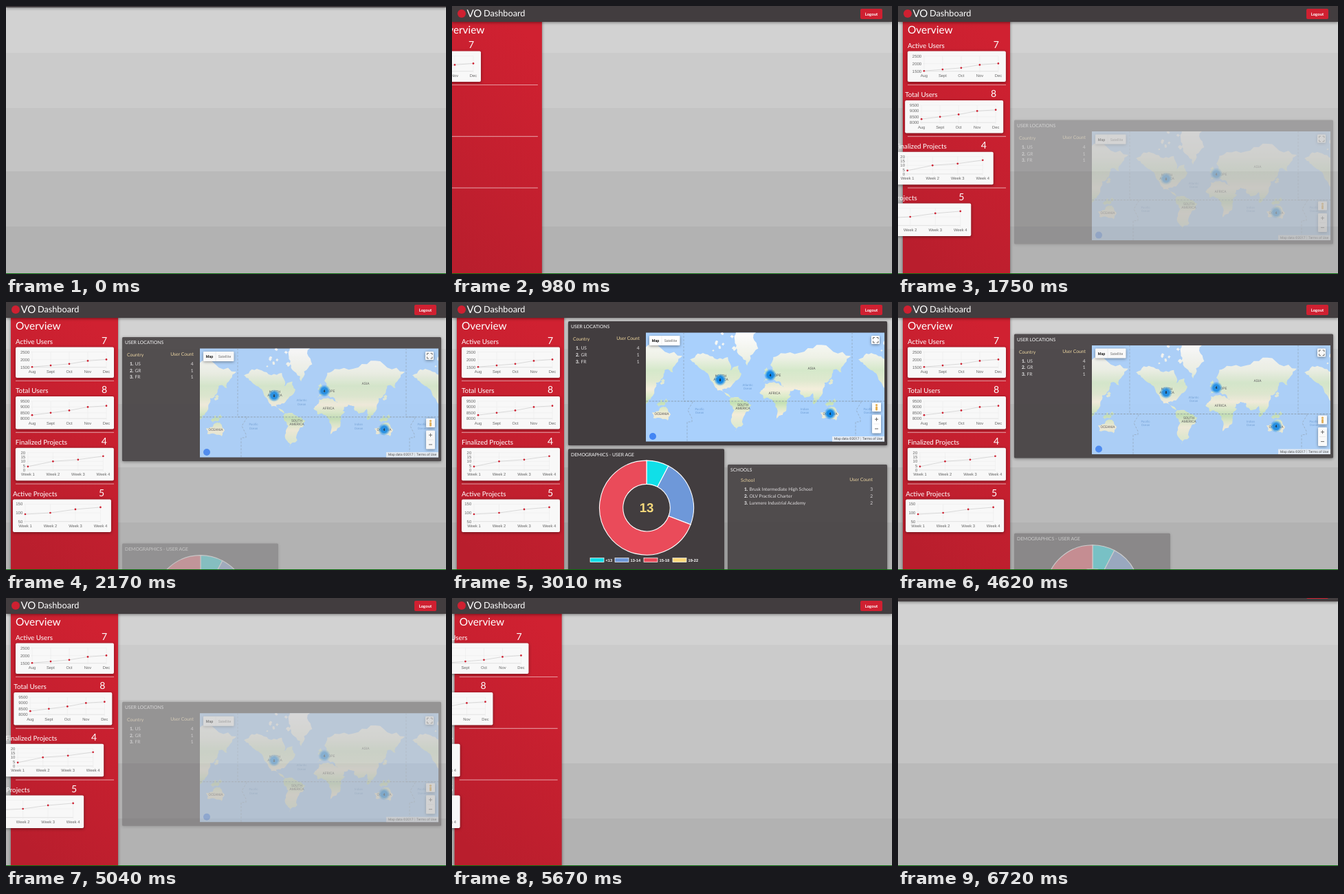
Write an HTML page that moves like this. It is 640 px wide and 389 px high and loops after 6790 ms.

```html
<!DOCTYPE html>
<html lang="en">
<head>
<meta charset="utf-8">
<title>Dashboard</title>
<style>
  html, body { margin: 0; width: 100%; height: 100%; overflow: hidden; background: #c4c4c4; }
  svg { display: block; width: 100vw; height: 100vh; }
  text { font-family: Lato, "Open Sans", sans-serif; text-rendering: geometricPrecision; }
  .ui { font-family: "Liberation Sans", sans-serif; }
  .map { font-family: Roboto, sans-serif; }
  .bold { font-weight: 700; }
  .shadow { filter: drop-shadow(0 1px 2px rgba(0,0,0,.45)); }
</style>
</head>
<body>
<svg id="stage" viewBox="0 0 640 389" preserveAspectRatio="none"></svg>
<script>
const LOOP = 6790, STEP = 70, TURN = 6825;
const DARK = '#423d3f', RED = '#cf2031', GOLD = '#f0d79c';
const MID = 'text-anchor="middle"', END = 'text-anchor="end"';

const rect = (x, y, w, h, fill, more = '') =>
  `<rect x="${x}" y="${y}" width="${w}" height="${h}" fill="${fill}" ${more}/>`;
const text = (x, y, s, size, fill = '#fff', more = '') =>
  `<text x="${x}" y="${y}" font-size="${size}" fill="${fill}" ${more}>${s}</text>`;
const line = (x1, y1, x2, y2, stroke, width = .5, more = '') =>
  `<path d="M${x1} ${y1}L${x2} ${y2}" stroke="${stroke}" stroke-width="${width}" ${more}/>`;
const circle = (x, y, r, fill, more = '') =>
  `<circle cx="${x}" cy="${y}" r="${r}" fill="${fill}" ${more}/>`;
const group = (id, body) => `<g id="${id}">${body}</g>`;
const join = (list, draw) => list.map(draw).join('');

// Each band covers the lower part of the one before
const bands = { 0: '#d2d2d2', 68: '#cbcbcb', 148: '#c4c4c4', 240: '#bababa', 320: '#b2b2b2' };
const background = join(Object.entries(bands), ([y, fill]) => rect(0, y, 640, 389 - y, fill));

// Sidebar
const months = ['Aug', 'Sept', 'Oct', 'Nov', 'Dec'];
const weeks = [1, 2, 3, 4].map(n => 'Week ' + n);
const cards = [
  { title: 'Active Users', count: 7, labels: months, min: 1500, max: 2500, step: 500, values: [1520, 1620, 1720, 1920, 2010] },
  { title: 'Total Users', count: 8, labels: months, min: 8000, max: 9500, step: 500, values: [8300, 8500, 8700, 9000, 9100] },
  { title: 'Finalized Projects', count: 4, labels: weeks, min: 0, max: 20, step: 5, values: [4, 10, 12, 16] },
  { title: 'Active Projects', count: 5, labels: weeks, min: 50, max: 150, step: 50, values: [92, 100, 120, 132] }
];
const ruleY = i => 114.6 + 74.7 * i;

function card({ title, count, labels, min, max, step, values }, i) {
  const top = i ? ruleY(i - 1) + 22.4 : 65.5, height = i ? 47.5 : 44.5;
  const left = labels === months ? 38 : 32, gap = labels === months ? 27 : 36.5;
  const high = top + 7, low = top + height - 15.3;
  const xAt = k => left + k * gap;
  const yAt = v => low - (v - min) / (max - min) * (low - high);
  let s = text(14, top - 4.8, title, 9.8) + text(143, top - 4.8, count, 14, '#fff', MID) +
    rect(14, top, 143, height, '#f8f8f8', 'rx="2" class="shadow"');
  for (let v = min; v <= max; v += step) {
    s += line(left - 2, yAt(v), xAt(labels.length - 1), yAt(v), v === min ? '#ccc' : '#e9e9e9');
    s += text(left - 3.7, yAt(v) + 2, v, 6, '#666', END + ' class="ui"');
  }
  s += join(labels, (l, k) => line(xAt(k), high, xAt(k), low + 2, '#e9e9e9') +
    text(xAt(k), low + 8.3, l, 5.8, '#666', MID + ' class="ui"'));
  const points = values.map((v, k) => [xAt(k), yAt(v)]);
  s += `<polyline points="${points}" fill="none" stroke="#ccc" stroke-width=".7"/>`;
  return group('card' + i, s + join(points, p => circle(...p, 1.35, RED)));
}

const sidebar = rect(7, 18, 156, 371, 'url(#red)', 'class="shadow"') + text(14, 40, 'Overview', 15.4) +
  join([0, 1, 2], i => line(14, ruleY(i), 157, ruleY(i), '#fff', .8, 'opacity=".75"')) + join(cards, card);

const header = rect(0, -10, 640, 33, DARK, 'class="shadow"') +
  circle(14, 11, 6, RED) + text(21.5, 16, 'VO', 15) + text(46, 15.2, 'Dashboard', 12.7) +
  rect(594, 4, 32, 15, RED, 'rx="2"') + text(610, 13.5, 'Logout', 6, '#fff', MID + ' class="bold"');

// World map: Mercator outlines from key points, roughened by midpoint displacement
const PERIOD = 245, EQUATOR = 144, DATE_LINE = 337;
const project = (lon, lat) => [
  459 + lon * PERIOD / 360,
  EQUATOR - PERIOD / (2 * Math.PI) * Math.log(Math.tan(Math.PI / 4 + lat * Math.PI / 360))
];
let seed = 7;
const random = () => (seed = seed * 16807 % 2147483647) / 2147483647 - .5;

function roughen(points) {
  return points.flatMap(([x, y], i) => {
    const [nx, ny] = points[(i + 1) % points.length], k = random() * .4;
    return [[x, y], [(x + nx) / 2 - (ny - y) * k, (y + ny) / 2 + (nx - x) * k]];
  });
}
const outline = points => 'M' + join(roughen(roughen(roughen(points))),
  p => p.map(v => v.toFixed(1)).join(' ') + ' ') + 'Z';
const coast = keys => outline(keys.split(' ').map(key => project(...key.split(',').map(Number))));

const continents = [
  '-166,66 -128,70 -85,68 -80,55 -62,60 -56,50 -80,28 -97,25 -79,8 -107,22 -124,45 -150,60',
  '-78,8 -50,0 -35,-7 -48,-27 -68,-54 -74,-45 -71,-18 -81,-4',
  '-6,35 32,31 50,11 40,-8 32,-28 19,-35 10,3 -8,5 -17,18',
  '-9,38 10,55 6,61 28,71 105,76 178,69 158,52 140,55 122,37 118,24 103,2 97,17 78,8 70,22 57,25 44,13 34,30 27,38 10,43',
  '114,-23 135,-12 143,-12 153,-27 147,-38 116,-34',
  '-70,78 -55,83 -25,83 -20,74 -44,60 -54,68'
];
function archipelago(lon, lat, width, height, count) {
  return join(Array(count).fill(), () => {
    const [x, y] = project(lon + random() * width, lat + random() * height), r = 2.5 + 2 * random();
    return outline([[x - r, y], [x, y - r], [x + r, y], [x, y + r]]);
  });
}
const land = join(continents, coast) + archipelago(-95, 76, 50, 10, 9) + archipelago(122, -3, 45, 10, 8) +
  archipelago(137, 36, 8, 10, 3) + archipelago(-3, 54, 3, 6, 2);

// Vegetation follows latitude
const climate = { 80: '#fbfbfb', 68: '#eef1e6', 55: '#d5e8ca', 40: '#dfe9cf', 25: '#f4eedc', 10: '#dcebc9',
  '-3': '#c3e0b4', '-15': '#dde9c8', '-27': '#f3ecd8', '-45': '#e0ead0' };
const climateStops = join(Object.keys(climate).sort((a, b) => b - a), lat =>
  `<stop offset="${project(0, +lat)[1] / 389}" stop-color="${climate[lat]}"/>`);

const mapLabel = (x, y, s, fill = '#555', size = 5) =>
  join(s.split(' '), (w, i) => text(x, y + i * 5.3, w, size, fill, MID + ' class="map"'));
const ocean = (x, y, name) => mapLabel(x, y, name + ' Ocean', '#6f9fd8', 4.4);
const cluster = (x, y, n) => circle(x, y, 8.5, '#1b8fea', 'opacity=".3"') + circle(x, y, 7, '#1b8fea', 'opacity=".55"') +
  circle(x, y, 5.4, '#168ae6') + text(x, y + 1.9, n, 5.2, '#111', MID + ' class="ui bold"');
const dateLine = x => `<path d="M${x} 44v100h14l-8 13l6 12v5h-7v29" fill="none"
  stroke="#8b9bab" stroke-width=".6" stroke-dasharray="3 2"/>`;
const button = (x, y, w, h) => rect(x, y, w, h, '#fff', 'rx="1" class="shadow"');
const bar = (x, y) => line(x - 2.5, y, x + 2.5, y, '#666', 1);

const mapControls = button(287, 49, 44.5, 14) + line(305, 49, 305, 63, '#ddd') +
  text(296, 58, 'Map', 5.4, '#111', MID + ' class="map bold"') +
  text(318, 58, 'Satellite', 5.2, '#666', MID + ' class="map"') +
  button(610, 49, 12, 12) +
  rect(612.5, 51.5, 7.5, 7.5, 'none', 'stroke="#666" stroke-dasharray="2.5 2.5 2.5 0"') +
  button(611, 146, 13, 13) + circle(617.5, 149.6, 1.6, '#e6b053') + rect(616, 151.5, 3, 6, '#e6b053', 'rx="1"') +
  button(611, 163.5, 13, 27) + line(613, 177, 622, 177, '#ddd') +
  bar(617.5, 170.2) + line(617.5, 167.7, 617.5, 172.7, '#666', 1) + bar(617.5, 184) +
  circle(292, 195, 5, '#4285f4') +
  rect(553, 195, 76, 8, '#f5f5f5', 'opacity=".8"') + text(556, 200.4, 'Map data ©2017', 4.9, '#444', 'class="map"') +
  line(594.5, 196, 594.5, 201, '#aaa') + text(626, 200.4, 'Terms of Use', 4.9, '#444', END + ' class="map"');

const worldMap = `<g clip-path="url(#mapClip)">` + rect(282, 44, 347, 159, '#a9d0fc') +
  group('world', `<path d="${land}" fill="url(#climate)"/>`) +
  join([-PERIOD, PERIOD], x => `<use href="#world" x="${x}"/>`) +
  line(282, EQUATOR, 629, EQUATOR, '#7f8b96', .7, 'stroke-dasharray="3 1.6"') +
  dateLine(DATE_LINE) + dateLine(DATE_LINE + PERIOD) +
  mapLabel(391, 109, 'NORTH AMERICA') + mapLabel(423, 151, 'SOUTH AMERICA') + mapLabel(469, 133.5, 'AFRICA') +
  mapLabel(523, 97.5, 'ASIA') + mapLabel(469, 108, 'EUROPE') +
  mapLabel(305, 164, 'OCEANIA') + mapLabel(305 + PERIOD, 164, 'OCEANIA') +
  ocean(430, 121.5, 'Atlantic') + ocean(513, 156.5, 'Indian') +
  ocean(360, 156.5, 'Pacific') + ocean(360 + PERIOD, 156.5, 'Pacific') +
  cluster(390, 113, 8) + cluster(463, 106, 4) + cluster(550, 162, 4) + mapControls + '</g>';

// Panels
const panel = (x, w, h, y, title) => rect(x, y, w, h, DARK, 'rx="1.5" class="shadow"') +
  text(x + 4, y + 10.4, title, 6.8);
const rows = (list, x, right, y, dy) => join(Object.entries(list), ([name, n], i) =>
  text(x, y + i * dy, `${i + 1}.`, 6.6, '#fff', 'class="bold"') +
  text(x + 7.5, y + i * dy, name, 6.6, '#e4e2e2') + text(right, y + i * dy, n, 6.6, '#e4e2e2', END));

const locations = panel(169, 464, 180, 28, 'USER LOCATIONS') +
  text(176, 56, 'Country', 6.8, GOLD) + text(273, 55, 'User Count', 6.8, GOLD, END) +
  rows({ US: 4, GR: 1, FR: 1 }, 180, 272.5, 69.3, 9.6) + worldMap;

const ages = [['&lt;13', 1, '#10dfe8'], ['13-14', 3, '#6e98d9'], ['15-18', 9, '#ea4b5a'], ['19-22', 0, '#fcd97a']];
const users = ages.reduce((sum, [, n]) => sum + n, 0);

function donut(cx, cy, R) {
  const r = R / 2;
  const at = (radius, k) => [cx + radius * Math.sin(k), cy - radius * Math.cos(k)].join(' ');
  let end = 0;
  return join(ages, ([, n, fill]) => {
    const a = end, b = end += n / users * 2 * Math.PI, big = +(b - a > Math.PI);
    return n ? `<path d="M${at(R, a)}A${R} ${R} 0 ${big} 1 ${at(R, b)}L${at(r, b)}A${r} ${r} 0 ${big} 0 ${at(r, a)}Z"
      fill="${fill}" stroke="#fff" stroke-width="1.1"/>` : '';
  });
}
function legend(x, y) {
  return join(ages, ([label, , fill]) => {
    const s = rect(x, y, 20, 6, fill, 'stroke="#fff" stroke-width=".7"') +
      text(x + 22.5, y + 5.1, label, 5.7, '#fff', 'class="ui bold"');
    x += 27 + 3 * label.replace('&lt;', '<').length;
    return s;
  });
}
const demographics = panel(169, 227, 190, 213, 'DEMOGRAPHICS - USER AGE') + donut(283, 298.5, 68.5) +
  text(283, 305, users, 18.6, '#f6da7c', MID + ' class="ui bold"') + legend(201, 371.5);

const schools = panel(401, 232, 190, 213, 'SCHOOLS') +
  text(420, 238, 'School', 6.8, GOLD) + text(612, 237.3, 'User Count', 6.8, GOLD, END) +
  rows({ 'Brusk Intermediate High School': 3, 'OLV Practical Charter': 2, 'Lunmere Industrial Academy': 2 },
    425, 612, 251.4, 10);

const panels = [locations, demographics, schools];

document.getElementById('stage').innerHTML = `<defs>
  <linearGradient id="red" x1=".7" y1="0" x2=".3" y2="1"><stop stop-color="#d02131"/><stop offset="1" stop-color="#b91e2d"/></linearGradient>
  <linearGradient id="climate" gradientUnits="userSpaceOnUse" x1="0" y1="0" x2="0" y2="389">${climateStops}</linearGradient>
  <clipPath id="mapClip">${rect(282, 44.5, 347, 158, '#000')}</clipPath></defs>` +
  background + join(panels, (body, i) => group('panel' + i, body)) +
  group('sidebar', sidebar) + group('header', header) + rect(0, 388, 640, 1, '#0a6e0c');

// Motion
const $ = id => document.getElementById(id);
const move = (id, x, y) => $(id).setAttribute('transform', `translate(${x.toFixed(2)} ${y.toFixed(2)})`);
const progress = (u, start, duration) => Math.min(1, Math.max(0, (u - start) / duration));
const remaining = (u, start, duration) => (1 - progress(u, start, duration)) ** 3;
const inOut = p => p < .5 ? 2 * p * p : 1 - 2 * (1 - p) ** 2;

function draw(time) {
  const t = Math.floor(time % LOOP / STEP) * STEP;
  const u = Math.min(t, TURN - t); // plays forward, then back
  move('header', 0, -23 * (1 - inOut(progress(u, -181, 870))));
  move('sidebar', -170 * remaining(u, 735, 575), 0);
  cards.forEach((_, i) => move('card' + i, -142 * remaining(u, 809 + i * 213, 1040), 0));
  panels.forEach((_, i) => {
    const left = remaining(u, 1644 + i * 420, 1040);
    move('panel' + i, 0, 190 * left);
    $('panel' + i).setAttribute('opacity', (1 - left).toFixed(3));
  });
}

const begin = performance.now();
function tick() {
  draw(performance.now() - begin);
  requestAnimationFrame(tick);
}
tick();
</script>
</body>
</html>
```
